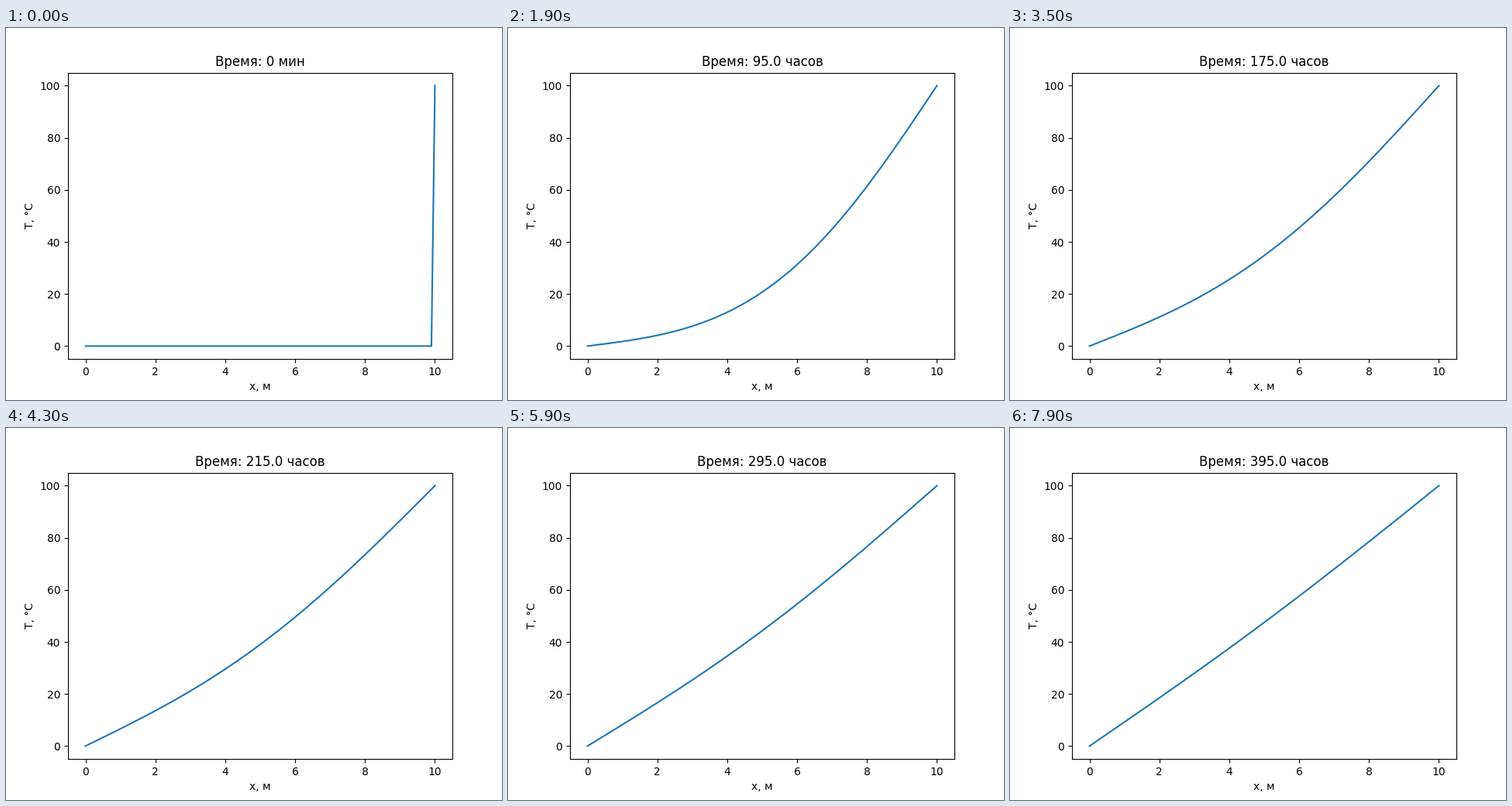
A matplotlib script for the animation above (8 s loop, 640 by 480 pixels).

```python
import numpy as np
import matplotlib.pyplot as plt
from matplotlib.animation import FuncAnimation

LENGTH = 10.0        # rod length, m
T_END = 100.0        # temperature held at the right end
DIFFUSIVITY = 2.3e-5  # m^2/s
FRAMES = 80
STEP_MIN = 300       # simulated minutes per frame

plt.rcParams["font.family"] = "DejaVu Sans"

x = np.linspace(0, LENGTH, 101)
modes = np.arange(1, 61)
coeffs = 2 * T_END / (np.pi * modes) * (-1.0) ** modes
shapes = np.sin(np.pi * np.outer(x, modes) / LENGTH)


def temperature(minutes):
    """Fourier solution of the heat equation for a rod heated at one end."""
    if minutes == 0:
        temp = np.zeros_like(x)
    else:
        rate = DIFFUSIVITY * (np.pi * modes / LENGTH) ** 2
        temp = T_END * x / LENGTH + shapes @ (coeffs * np.exp(-rate * minutes * 60))
    temp[0], temp[-1] = 0, T_END
    return temp


def time_label(minutes):
    if minutes < 60:
        return f"Время: {minutes} мин"
    return f"Время: {minutes / 60:.1f} часов"


fig, ax = plt.subplots(figsize=(6.4, 4.8), dpi=100)
line, = ax.plot(x, temperature(0), color="#1f77b4", lw=1.5)
ax.set_xlim(-0.5, 10.5)
ax.set_ylim(-5, 105)
ax.set_xlabel("x, м")
ax.set_ylabel("T, °C")
title = ax.set_title(time_label(0))


def update(frame):
    minutes = frame * STEP_MIN
    line.set_ydata(temperature(minutes))
    title.set_text(time_label(minutes))
    return line, title


anim = FuncAnimation(fig, update, frames=FRAMES, interval=100,
                     init_func=lambda: update(0), repeat=True, repeat_delay=0)
plt.show()
```
